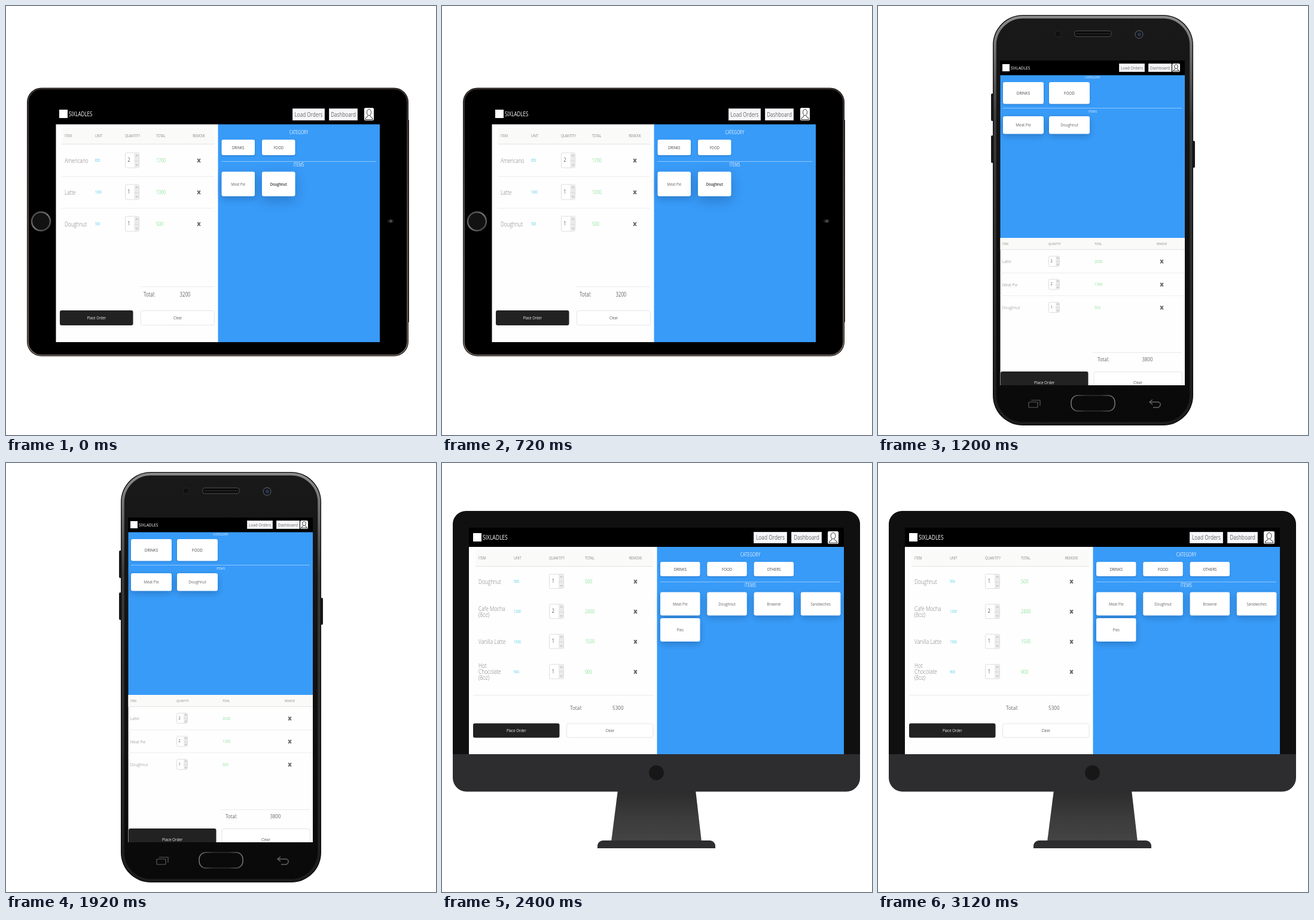
These frames come from a looping animation (719x716 px, 3.6 s). An HTML page with a canvas:

```html
<!DOCTYPE html>
<html lang="en">
<head>
<meta charset="utf-8">
<title>Till on three devices</title>
<style>
  html, body { margin: 0; width: 100%; height: 100%; overflow: hidden; background: #fff; }
  canvas { display: block; }
</style>
</head>
<body>
<canvas id="stage" width="719" height="716"></canvas>
<script>
const ctx = document.getElementById('stage').getContext('2d');
const BLUE = '#389bf8', GREEN = '#8fe39b', CYAN = '#4fcbe9', GREY = '#7b7b7b';
const HOLD = 1200;
let tall = 1; // each screenshot is narrowed as a whole, so its type is taller than wide

function box(x1, y1, x2, y2, fill, radius = 0, stroke, width = 1) {
  ctx.beginPath();
  ctx.roundRect(x1, y1, x2 - x1, y2 - y1, radius);
  if (fill) { ctx.fillStyle = fill; ctx.fill(); }
  if (stroke) { ctx.strokeStyle = stroke; ctx.lineWidth = width; ctx.stroke(); }
}

function path(points, stroke, width = 1) {
  ctx.beginPath();
  for (const [x, y] of points) ctx.lineTo(x, y);
  ctx.strokeStyle = stroke;
  ctx.lineWidth = width;
  ctx.stroke();
}

const rule = (x1, x2, y, color) => box(x1, y, x2, y + 1, color);

function disc(x, y, r, fill, stroke, width = 1) {
  ctx.beginPath();
  ctx.arc(x, y, r, 0, 2 * Math.PI);
  if (fill) { ctx.fillStyle = fill; ctx.fill(); }
  if (stroke) { ctx.strokeStyle = stroke; ctx.lineWidth = width; ctx.stroke(); }
}

function gradient(x1, y1, x2, y2, ...colors) {
  const g = ctx.createLinearGradient(x1, y1, x2, y2);
  colors.forEach((c, i) => g.addColorStop(i / (colors.length - 1), c));
  return g;
}

// y is the middle of the capitals
function text(str, x, y, size, color, align = 'left', weight = 400) {
  ctx.save();
  ctx.translate(x, y);
  ctx.scale(1, tall);
  ctx.font = `${weight} ${size}px "Open Sans", sans-serif`;
  ctx.textAlign = align;
  ctx.fillStyle = color;
  ctx.fillText(str, 0, size * 0.357);
  ctx.restore();
}

function button(label, x1, y1, x2, y2, size, fill, color,
    { border, radius = 3, shadow = 0, weight, ty = (y1 + y2) / 2 } = {}) {
  ctx.save();
  ctx.shadowColor = 'rgba(0,20,60,.25)';
  ctx.shadowBlur = shadow;
  ctx.shadowOffsetY = shadow / 3;
  box(x1, y1, x2, y2, fill, radius);
  ctx.restore();
  if (border) box(x1 + .5, y1 + .5, x2 - .5, y2 - .5, null, radius, border);
  text(label, (x1 + x2) / 2, ty, size, color, 'center', weight);
}

function userIcon(x1, y1, x2, y2) {
  box(x1, y1, x2, y2, '#fff', 2);
  const w = x2 - x1, h = y2 - y1, cx = (x1 + x2) / 2;
  ctx.beginPath();
  ctx.ellipse(cx, y1 + h * .36, w * .22, h * .25, 0, 0, 2 * Math.PI);
  ctx.moveTo(cx - w * .13, y1 + h * .6);
  ctx.quadraticCurveTo(cx - w * .1, y1 + h * .72, x1 + w * .15, y1 + h * .8);
  ctx.lineTo(x1 + w * .12, y2 - 1.5);
  ctx.lineTo(x2 - w * .12, y2 - 1.5);
  ctx.lineTo(x2 - w * .15, y1 + h * .8);
  ctx.quadraticCurveTo(cx + w * .1, y1 + h * .72, cx + w * .13, y1 + h * .6);
  ctx.strokeStyle = '#333';
  ctx.stroke();
}

function quantity(value, x, y, w, h, size) {
  const top = y - h / 2, split = x + w * .64, cx = x + w * .82;
  box(x + .5, top + .5, x + w - .5, top + h - .5, '#fff', 2, '#dedede');
  box(split, top + 1, x + w - 1, top + h - 1, '#ebebeb');
  rule(split, x + w - 1, Math.round(y), '#dadada');
  for (const s of [-1, 1]) {
    const ay = y + s * h * .3;
    path([[cx - 1.5, ay - s], [cx, ay + s], [cx + 1.5, ay - s]], '#aaa');
  }
  text(value, x + w * .27, y - .5, size, '#555', 'center');
}

function cross(x, y) {
  for (const s of [-2.3, 2.3]) path([[x - s, y - 3], [x + s, y + 3]], '#666', 2);
}

function header(s) {
  const [x, y, side, size] = s.brand;
  box(x, y, x + side, y + side, '#fff');
  text('SIXLADLES', x + side + 2, y + side / 2, size, '#fff');
  for (const [label, x1, x2] of s.nav)
    button(label, x1, s.navY[0], x2, s.navY[1], s.navSize, '#f8f7fa', '#666', { border: '#d9d5df', radius: 1 });
  userIcon(...s.icon);
}

function table(s) {
  const c = s.cols, [x1, y1, x2, y2] = s.head;
  box(x1, y1, x2, y2, '#fafaf8');
  rule(x1, x2, y2 - 1, '#e3e3e3');
  for (const [key, label] of [['item', 'ITEM'], ['unit', 'UNIT'], ['qty', 'QUANTITY'], ['total', 'TOTAL']])
    if (c[key]) text(label, c[key], s.headY, s.headSize, '#888');
  text('REMOVE', c.remove, s.headY, s.headSize, '#888', 'center');
  s.rows.forEach(([name, unit, count, total], i) => {
    const y = s.rowY + i * s.rowStep, lines = name.split('\n');
    lines.forEach((line, k) =>
      text(line, c.item, y + (k - (lines.length - 1) / 2) * 9.8, s.itemSize, GREY, 'left', 300));
    if (c.unit) text(unit, c.unit, y, s.unitSize, CYAN);
    quantity(count, c.qty, y - .5, ...s.qtyBox, s.totalSize);
    text(total, c.total, y, s.totalSize, GREEN);
    cross(c.remove, y);
    if (s.rowLines && i < s.rows.length - 1)
      rule(x1, x2, Math.round(y + s.rowStep / 2) - 1, '#eee');
  });
}

function footer(s) {
  const f = s.foot, [y1, y2] = f.y;
  rule(...f.line, '#eaeaea');
  text('Total:', f.sumX[0], f.sumY, f.sumSize, '#666');
  text(f.sum, f.sumX[1], f.sumY, f.sumSize, '#666');
  button('Place Order', f.place[0], y1, f.place[1], y2, f.size, '#222', '#eee', { ty: f.textY });
  button('Clear', f.clear[0], y1, f.clear[1], y2, f.size, '#fff', '#555', { border: '#e5e5e5', ty: f.textY });
}

function menu(s) {
  const m = s.menu;
  const tile = (label, col, y, h) => {
    const x = m.x + col * m.step;
    return [label, x, y, x + m.w, y + h, m.size, '#fff'];
  };
  text('CATEGORY', m.cx, m.catY, m.titleSize, '#e4f1ff', 'center');
  m.cats.forEach((label, i) => button(...tile(label, i, m.y1, m.h1), '#444', { shadow: 3 }));
  rule(m.x, m.right, m.lineY, '#8ec6fb');
  text('ITEMS', m.cx, m.itemsY, m.titleSize, '#e4f1ff', 'center');
  m.items.forEach((label, i) => {
    const hovered = label === m.hovered;
    button(...tile(label, i % 4, m.y2 + (i >> 2) * 43.5, m.h2), hovered ? '#333' : '#666',
      { shadow: hovered ? 20 : 12, weight: hovered ? 600 : 400 });
  });
}

function screen(s) {
  tall = s.tall;
  ctx.save();
  ctx.beginPath();
  ctx.rect(...s.clip);
  ctx.clip();
  box(...s.paper, '#fefefe');
  box(...s.blue, BLUE);
  header(s);
  menu(s);
  table(s);
  footer(s);
  ctx.restore();
}

const tablet = {
  tall: 1.31, clip: [83.5, 160, 541.5, 401], paper: [83, 197.5, 355, 561], blue: [354.5, 197.5, 625, 561],
  brand: [89, 173, 14, 8], navSize: 8.1, navY: [171, 191],
  nav: [['Load Orders', 479, 533], ['Dashboard', 540, 588]], icon: [599, 170, 615, 191],
  head: [93, 203, 348, 231], headY: 217, headSize: 5.2,
  cols: { item: 98, unit: 149, qty: 199, total: 251, remove: 322.5 },
  rows: [['Americano', '850', '2', '1700'], ['Latte', '1000', '1', '1000'], ['Doughnut', '500', '1', '500']],
  rowY: 258, rowStep: 53, rowLines: true, itemSize: 8.2, unitSize: 4.8, totalSize: 7, qtyBox: [24, 26],
  foot: { line: [225, 348, 468], sumX: [230, 290.5], sumY: 481, sumSize: 7.8, sum: '3200',
    y: [508, 533], place: [90, 212.5], clear: [225, 349], size: 5.8 },
  menu: { x: 360.5, step: 67.5, w: 55.5, right: 619, cx: 489.5, size: 5.8, titleSize: 6.3,
    catY: 211, y1: 223, h1: 26, lineY: 259, itemsY: 265, y2: 276.5, h2: 41,
    cats: ['DRINKS', 'FOOD'], items: ['Meat Pie', 'Doughnut'], hovered: 'Doughnut' }
};

const phone = {
  tall: 1.16, clip: [204.5, 91, 308.5, 542], paper: [204, 387, 513, 633], blue: [204, 115.5, 513, 387],
  brand: [208, 97, 12, 6.6], navSize: 6.4, navY: [96, 110],
  nav: [['Load Orders', 403, 446], ['Dashboard', 452, 491]], icon: [492, 96, 505, 110],
  head: [204, 387, 513, 407], headY: 397, headSize: 4.3,
  cols: { item: 208, qty: 285, total: 362, remove: 474.5 },
  rows: [['Latte', '', '2', '2000'], ['Meat Pie', '', '2', '1300'], ['Doughnut', '', '1', '500']],
  rowY: 426.5, rowStep: 38.5, rowLines: true, itemSize: 6.5, totalSize: 5.8, qtyBox: [19, 18],
  foot: { line: [359, 508, 578], sumX: [367, 441.5], sumY: 589.5, sumSize: 7.9, sum: '3800',
    y: [610, 647], place: [205, 351.5], clear: [360.5, 508.5], size: 6.3 },
  menu: { x: 209, step: 77, w: 68, right: 508, cx: 359, size: 6.35, titleSize: 5.1,
    catY: 118.5, y1: 127, h1: 36.5, lineY: 170, itemsY: 175.5, y2: 184, h2: 29.5,
    cats: ['DRINKS', 'FOOD'], items: ['Meat Pie', 'Doughnut'] }
};

const desktop = {
  tall: 1.2, clip: [45, 108, 627, 378], paper: [45, 140, 360, 486], blue: [359.5, 140, 672, 486],
  brand: [52, 117, 14, 8.5], navSize: 8.3, navY: [115, 134],
  nav: [['Load Orders', 521, 577], ['Dashboard', 584, 635]], icon: [645, 114, 663, 135],
  head: [56, 145, 353, 173], headY: 159, headSize: 5.45,
  cols: { item: 61, unit: 120, qty: 179, total: 239, remove: 323.5 },
  rows: [['Doughnut', '500', '1', '500'], ['Cafe Mocha\n(8oz)', '1200', '2', '2400'],
    ['Vanilla Latte', '1500', '1', '1500'], ['Hot\nChocolate\n(8oz)', '900', '1', '900']],
  rowY: 198, rowStep: 50.2, itemSize: 8.4, unitSize: 5.2, totalSize: 7.2, qtyBox: [25, 25],
  foot: { line: [52, 353, 387], sumX: [214, 285], sumY: 409, sumSize: 8.1, sum: '5300',
    y: [434.5, 458.5], place: [52, 196.5], clear: [208, 353.5], size: 6 },
  menu: { x: 365, step: 78.3, w: 66.5, right: 666, cx: 515.5, size: 6.1, titleSize: 6.7,
    catY: 153.5, y1: 165, h1: 24, lineY: 198, itemsY: 204.5, y2: 215.5, h2: 39,
    cats: ['DRINKS', 'FOOD', 'OTHERS'], items: ['Meat Pie', 'Doughnut', 'Brownie', 'Sandwiches', 'Pies'] }
};

function drawTablet() {
  box(671, 190, 674, 528, '#3a3230', 1);
  box(35, 136.5, 673, 584.5, '#1c1816', 24);
  box(37, 138.5, 671, 582.5, '#000', 22, gradient(0, 136, 0, 585, '#4d4643', '#8a7b73', '#a39389'), 1.2);
  disc(58.5, 359.5, 15.5, '#121212', gradient(42, 343, 75, 376, '#3a3a3a', '#777', '#333'), 2.5);
  box(638, 356, 648, 362, '#1c1c1c', 3);
  disc(643.5, 359, 2, '#555');
  screen(tablet);
}

function drawPhone() {
  for (const [x, y1, y2] of [[189, 146, 192], [189, 216, 262], [526, 225, 270]])
    box(x, y1, x + 4, y2, '#1a1a1a', 2);
  box(192, 15, 527, 700, '#080808', 50);
  box(195.5, 18.5, 523.5, 696.5, gradient(0, 15, 0, 700, '#191919', '#111', '#090909'), 47,
    gradient(0, 15, 0, 700, '#8c8c8c', '#3a3a3a', '#303030', '#262626', '#1c1c1c'), 4.5);
  box(328.5, 41.5, 390.5, 51, '#0a0a0a', 5, '#3c3c3c', 1.5);
  for (let x = 333; x < 388; x += 3) disc(x, 46.3, .9, '#484848');
  disc(301, 46.5, 5, '#101010', '#2a2a2a');
  disc(436.5, 47.5, 6.5, '#15171c', '#4a4e55', 1.3);
  disc(437, 47.5, 3, '#28344a');
  box(204, 91, 513, 116, '#000');
  screen(phone);
  box(323, 650, 396, 676, '#0a0a0a', 11, gradient(323, 0, 396, 0, '#777', '#2c2c2c', '#2c2c2c', '#777'), 1.5);
  box(252, 661, 267, 670, null, 1, '#5e5e5e', 1.2);
  path([[256, 658], [271, 658], [271, 667]], '#5e5e5e', 1.2);
  path([[459, 657], [454, 661], [459, 665]], '#666', 1.4);
  path([[454, 661], [469, 661], [472, 663], [472, 667], [469, 670], [460, 670]], '#666', 1.4);
}

function drawDesktop() {
  ctx.beginPath();
  for (const [x, y] of [[294, 546], [424, 546], [434, 632], [283, 632]]) ctx.lineTo(x, y);
  ctx.fillStyle = gradient(0, 548, 0, 632, '#2c2c2d', '#3b3b3c', '#444445');
  ctx.fill();
  box(260, 630, 457, 643, '#2e2e30', [9, 9, 0, 0]);
  box(18, 80, 699, 487, '#101010', [22, 22, 0, 0]);
  box(18, 486, 699, 548.5, '#2d2d2f', [0, 0, 23, 23]);
  disc(358.5, 517, 12.5, '#171717');
  box(45, 108, 672, 140, '#000');
  screen(desktop);
}

const scenes = [drawTablet, drawPhone, drawDesktop];

function render() {
  box(0, 0, 719, 716, '#fff');
  scenes[Math.floor(performance.now() / HOLD) % scenes.length]();
  requestAnimationFrame(render);
}
render();
</script>
</body>
</html>
```
